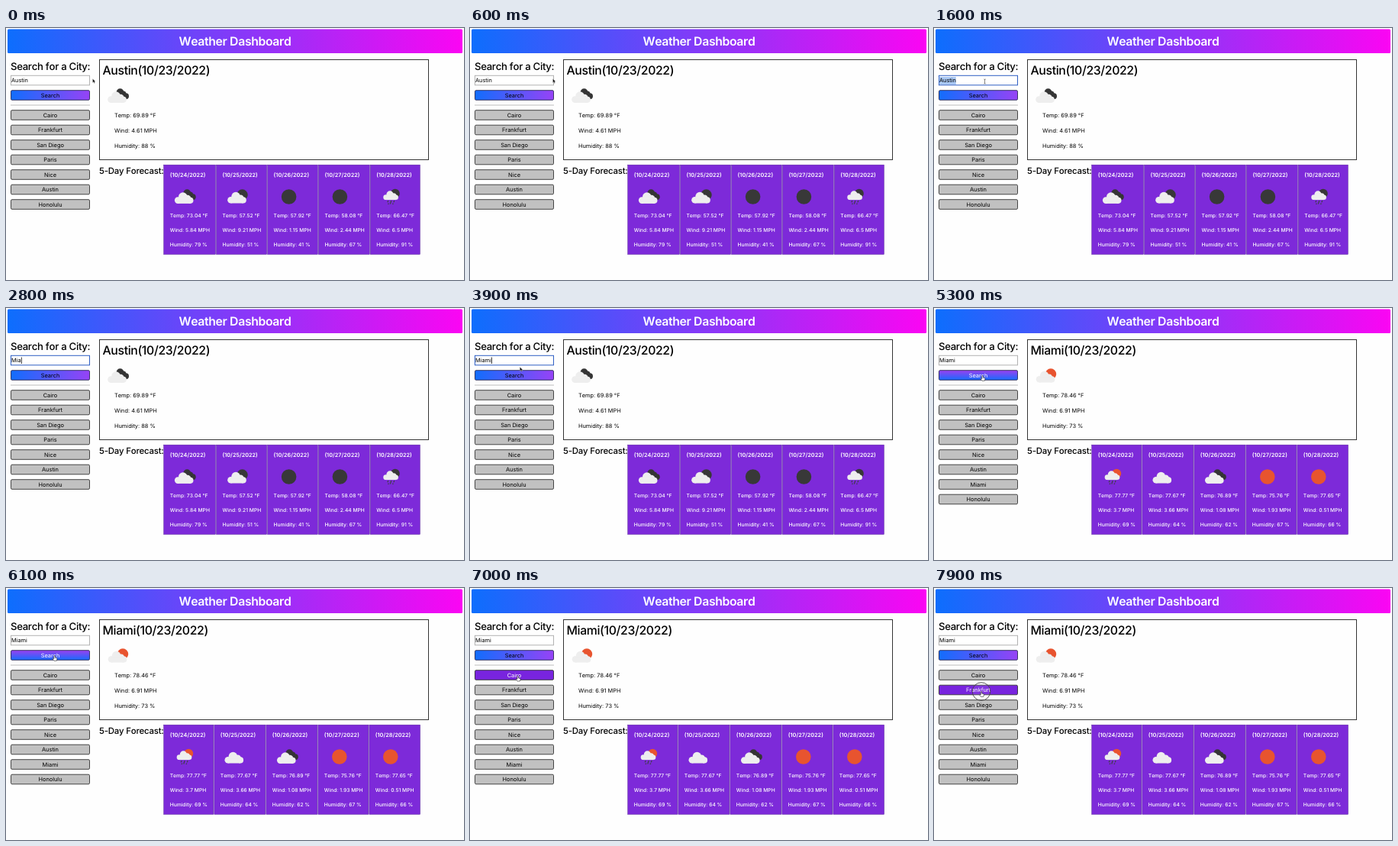
An HTML page for the animation above (8 s loop, 600 by 330 pixels).

```html
<!DOCTYPE html>
<html lang="en">
<head>
<meta charset="utf-8">
<title>Weather Dashboard</title>
<style>
  html, body { margin: 0; width: 100%; height: 100%; overflow: hidden; background: #fefefe; }
  svg { display: block; width: 600px; height: 330px; font-family: Inter, Roboto, sans-serif; text-rendering: geometricPrecision; }
  text { fill: #000; font-size: 7.4px; white-space: pre; font-kerning: none; }
  .title { fill: #fff; font-size: 15.8px; font-weight: 600; letter-spacing: -.34px; text-anchor: middle; }
  .h2 { font-size: 13.2px; font-weight: 500; letter-spacing: -.3px; }
  .h3 { font-size: 11.4px; font-weight: 500; letter-spacing: -.2px; }
  .city { font-size: 15.8px; font-weight: 500; letter-spacing: -.36px; }
  .btn text { text-anchor: middle; }
  .btn rect { fill: #c1c1c1; stroke: #333; stroke-width: .9; }
  .btn.hover rect { fill: #7824de; }
  .btn.hover text { fill: #fff; }
  .btn.search rect { fill: url(#across); stroke: #2b2b55; }
  .btn.search.hover rect { fill: url(#down); }
  .card rect { fill: #7d2ad9; stroke: #54209a; stroke-width: .5; }
  .card text { fill: #fff; font-size: 6.7px; font-weight: 500; }
  .card .date { font-size: 7.3px; font-weight: 600; }
</style>
</head>
<body>
<svg id="stage" viewBox="0 0 600 330" xmlns="http://www.w3.org/2000/svg">
  <defs>
    <linearGradient id="banner"><stop stop-color="#0d6efd"/><stop offset="1" stop-color="#fb05f3"/></linearGradient>
    <linearGradient id="across"><stop stop-color="#126dfd"/><stop offset="1" stop-color="#9643f6"/></linearGradient>
    <linearGradient id="down" x2="0" y2="1"><stop stop-color="#9a40f0"/><stop offset="1" stop-color="#176bfd"/></linearGradient>
    <g id="cloud">
      <circle cx="-9" cy="4.2" r="4.3"/><circle cx="-2.4" cy="-.4" r="5.8"/>
      <circle cx="3.6" cy="2" r="4.6"/><circle cx="7.2" cy="4.4" r="4.1"/>
      <rect x="-9" y="2.5" width="16.2" height="6"/>
    </g>
  </defs>
  <rect x="2" y="1.5" width="596" height="31.5" rx="1.5" fill="url(#banner)"/>
  <text class="title" x="300" y="23.2">Weather Dashboard</text>
  <text class="h2" x="6" y="54.5">Search for a City:</text>
  <rect id="field" x="6.5" y="62.3" width="103" height="12.5" fill="#fff"/>
  <rect id="selection" x="6.8" y="64" width="22" height="10" fill="#a9c8f4"/>
  <text id="typed" x="7" y="71.3"></text>
  <rect id="caret" y="64.5" width=".8" height="8.5" fill="#111"/>
  <path d="M6 101H110" stroke="#bdbdbd"/>
  <g id="buttons"></g>
  <rect x="122.5" y="41.5" width="431" height="131" fill="none" stroke="#333"/>
  <text class="h3" x="122" y="190.5">5-Day Forecast:</text>
  <g id="report"></g>
  <circle id="ring" r="11.8" fill="#fff" fill-opacity=".08" stroke="#444" stroke-width=".9"/>
  <g id="pointer">
    <path id="arrow" d="M0 0V5.2L1.3 4.1L2.1 6L3 5.6L2.2 3.8H3.8Z" fill="#111" stroke="#fff" stroke-width=".3"/>
    <path id="beam" d="M-1.2-3Q0-3 0-2.2Q0-3 1.2-3M0-2.5V2.5M-1.2 3Q0 3 0 2.2Q0 3 1.2 3" fill="none" stroke="#555" stroke-width=".7"/>
    <path id="hand" d="M-.7 .3Q0-.5 .7 .3V2.6L3 3.2Q3.6 3.5 3.4 4.4L2.8 6.8H-.7L-2.6 4.2Q-2.4 3.2-.7 4.3Z" fill="#fff" stroke="#222" stroke-width=".6"/>
  </g>
</svg>
<script>
const $ = id => document.getElementById(id);
const LOOP = 8000, STEP = 100, TODAY = 23;
const LOADED = 5200;

const austin = {
  city: 'Austin', icon: 'broken', ink: '#383838', now: ['69.89', '4.61', '88'],
  edges: [206.7, 275.5, 342.6, 409.4, 477.3, 543.3],
  days: [['broken', '73.04', '5.84', '79'], ['few', '57.52', '9.21', '51'], ['clear', '57.92', '1.15', '41'],
         ['clear', '58.08', '2.44', '67'], ['rain', '66.47', '6.5', '91']]
};
const miami = {
  city: 'Miami', icon: 'few', ink: '#e8542f', now: ['78.46', '6.91', '73'],
  edges: [206.7, 272.8, 340.8, 408.8, 475.8, 543.5],
  days: [['rain', '77.77', '3.7', '69'], ['cloudy', '77.67', '3.66', '64'], ['broken', '76.89', '1.08', '62'],
         ['clear', '75.76', '1.93', '67'], ['clear', '77.65', '0.51', '66']]
};

const label = (x, y, s, cls = '') => `<text x="${x}" y="${y}" class="${cls}">${s}</text>`;
const disc = (x, y, r, fill) => `<circle cx="${x}" cy="${y}" r="${r}" fill="${fill}"/>`;
const cloud = (fill, place = '') => `<use href="#cloud" fill="${fill}" transform="${place}"/>`;
const LIGHT = '#eeeeee', DARK = '#353535';

const icons = {
  clear: ink => disc(0, 0, 9.8, ink),
  cloudy: () => cloud(LIGHT, 'translate(-1 0)'),
  few: ink => disc(6, -2.5, 7.2, ink) + cloud(LIGHT),
  broken: () => disc(2.5, -4.8, 4.9, DARK) + disc(6.5, -2.5, 4, DARK) + disc(10, .3, 4, DARK) + cloud(LIGHT, 'translate(-.5 .4)'),
  rain: ink => disc(4.5, -4.2, 6, ink) + cloud(LIGHT, 'translate(-.4 -2.7) scale(.8)') +
    '<path d="M-4.5 5l-1 2.2M-.5 5l-1.5 4.5M3.5 5l-1 2.2M-4 8.5l-.7 1.6M2 8.5l-.7 1.6" stroke="#3f3f48" stroke-width="1.2"/>'
};
const icon = (kind, ink, x, y) => `<g transform="translate(${x} ${y})">${icons[kind](ink)}</g>`;

const readings = ([temp, wind, damp], x, y, gap) =>
  [`Temp: ${temp} °F`, `Wind: ${wind} MPH`, `Humidity: ${damp} %`]
    .map((s, i) => label(x, y + i * gap, s)).join('');

function report({ city, icon: kind, ink, now, edges, days }) {
  const cards = days.map(([sky, ...values], i) => {
    const x = edges[i], width = edges[i + 1] - x - 1;
    return `<g class="card"><rect x="${x}" y="179.2" width="${width}" height="117.2"/>` +
      label(x + 8, 194.7, `(10/${TODAY + 1 + i}/2022)`, 'date') +
      icon(sky, ink, x + 28, 221) + readings(values, x + 8, 248, 18.8) + '</g>';
  });
  return label(126.5, 61, `${city}(10/${TODAY}/2022)`, 'city') +
    icon(kind, ink, 147, 89) + readings(now, 142, 117.2, 20) + cards.join('');
}

const names = ['Search', 'Cairo', 'Frankfurt', 'San Diego', 'Paris', 'Nice', 'Austin', 'Honolulu'];
const middle = i => i ? 94.5 + 19.5 * i : 88;
const buttonList = list => list.map((name, i) =>
  `<g class="btn ${i ? '' : 'search'}"><rect x="6.5" y="${middle(i) - 6.3}" width="103" height="12.6" rx="1.5"/>` +
  label(58, middle(i) + 2.7, name) + '</g>').join('');

// Pointer stops: time, x, y
const stops = [[0, 113.5, 66.5], [300, 113.5, 66.5], [600, 108.5, 66.5], [1200, 66.5, 70],
  [3600, 66.5, 70], [4300, 63.5, 88.5], [6400, 63.5, 88.5], [7500, 62, 135.5], [LOOP, 62, 135.5]];

function pointerAt(t) {
  const i = stops.findIndex(s => s[0] > t);
  const [t0, x0, y0] = stops[i - 1], [t1, x1, y1] = stops[i];
  const p = (t - t0) / (t1 - t0), e = p * p * (3 - 2 * p);
  return [x0 + (x1 - x0) * e, y0 + (y1 - y0) * e];
}

const within = (t, a, b) => t >= a && t < b;
const show = (id, on) => $(id).style.display = on ? '' : 'none';

let shown = null;
function load(place) {
  if (place === shown) return;
  shown = place;
  $('report').innerHTML = report(place);
  const list = [...names];
  if (place === miami) list.splice(7, 1, 'Miami', 'Honolulu');
  $('buttons').innerHTML = buttonList(list);
}

function draw(t) {
  load(t < LOADED ? austin : miami);

  const letters = t < 2300 ? 0 : Math.min(5, 1 + Math.floor((t - 2300) / 200));
  const focused = within(t, 1300, 4600);
  $('typed').textContent = letters ? 'Miami'.slice(0, letters) : 'Austin';
  $('field').setAttribute('stroke', focused ? '#2f5fc4' : '#b2b2b2');
  show('selection', within(t, 1400, 2300));
  show('caret', letters && focused);
  $('caret').setAttribute('x', 7.3 + $('typed').getComputedTextLength());

  const [x, y] = pointerAt(t), place = `translate(${x} ${y})`;
  const visible = !within(t, 2300, 3600);
  let over = false;
  [...$('buttons').children].forEach((b, i) => {
    const hit = visible && x < 110 && Math.abs(y - middle(i)) < 6.5;
    b.classList.toggle('hover', hit);
    over = over || hit;
  });
  const editing = x < 108 && y < 75;
  $('pointer').setAttribute('transform', place);
  show('pointer', visible);
  show('beam', editing);
  show('hand', over);
  show('arrow', !editing && !over);
  $('ring').setAttribute('transform', place);
  show('ring', within(t, 1300, 1600) || within(t, 4600, 5000) || t >= 7700);
}

const start = performance.now();
function tick() {
  const t = (performance.now() - start) % LOOP;
  draw(Math.floor(t / STEP) * STEP);
  requestAnimationFrame(tick);
}
tick();
</script>
</body>
</html>
```
